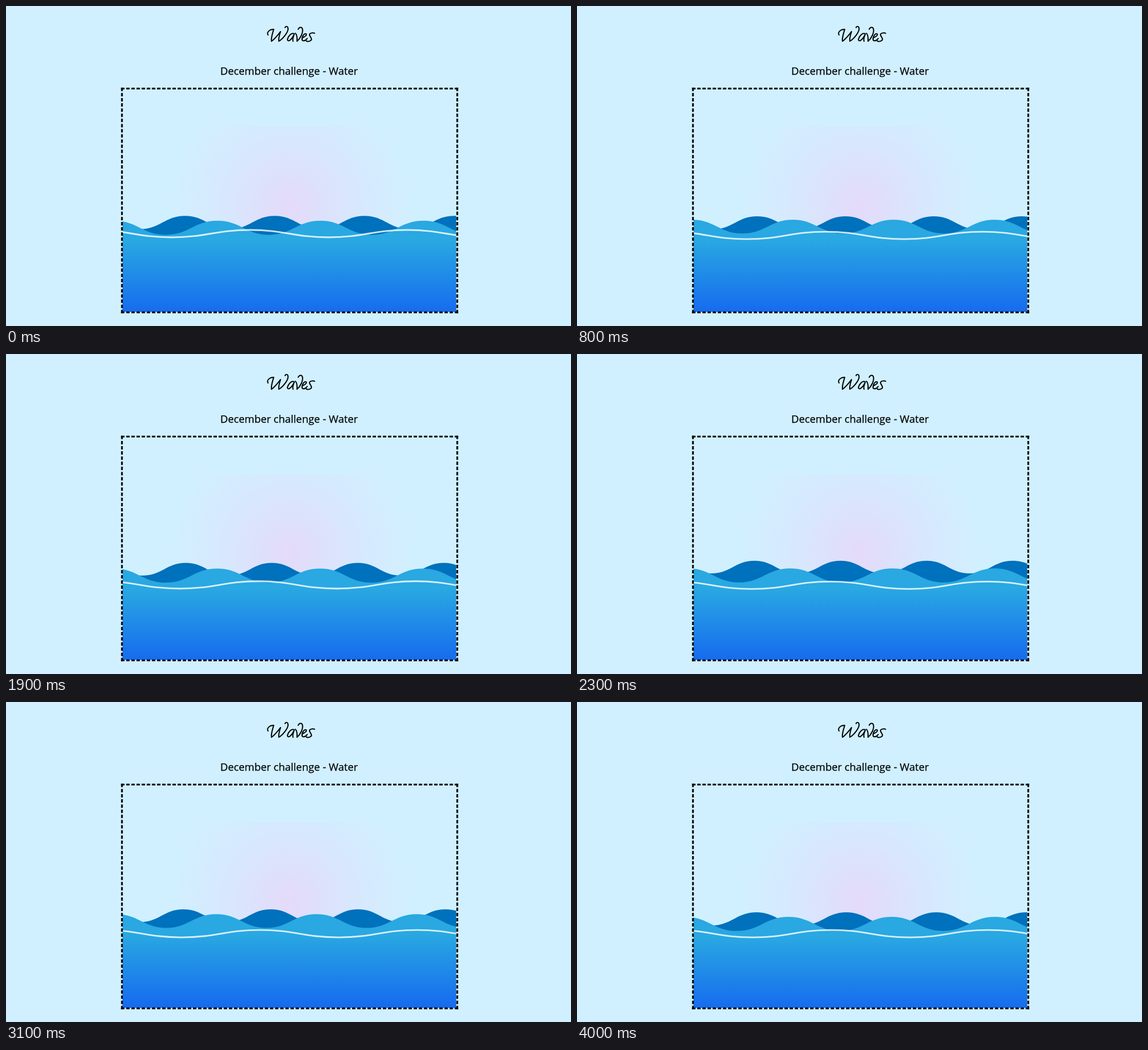
Animation, 994 px wide and 563 px high, one loop 4.1 s. Source, as an HTML page with a canvas:

```html
<!DOCTYPE html>
<html lang="en">
<head>
<meta charset="utf-8">
<title>Waves</title>
<style>
  html, body { margin: 0; width: 100%; height: 100%; overflow: hidden; background: #d0f0ff; }
  svg, canvas { position: absolute; left: 0; top: 0; }
  text { font: 18.4px "Open Sans", sans-serif; stroke: #000; stroke-width: .25; }
</style>
</head>
<body>
<canvas width="994" height="563"></canvas>
<svg width="994" height="140">
  <g role="img" aria-label="Waves" fill="none" stroke="#000" stroke-width="2" stroke-linecap="round" stroke-linejoin="round">
    <path d="M461 51C458 46 464 41 471 41C469 48 466 56 467 62C473 58 478 51 483 45C481 51 479 57 480 62C487 58 498 45 496 38C495 35 491 36 491 38"/>
    <path d="M507 49C502 46 496 54 495 59C496 64 502 60 507 50C505 55 504 60 505 62"/>
    <path d="M509 48C513 51 512 57 512 62C518 57 524 46 521 39C519 36 515 38 514 41"/>
    <path d="M521 56C525 55 530 51 528 49C525 47 520 54 521 60C523 63 528 60 530 57"/>
    <path d="M543 48C540 46 533 48 534 51C535 55 539 57 537 60C534 63 529 63 528 61"/>
  </g>
  <text x="377" y="120.5">December challenge - Water</text>
</svg>
<script>
const LEFT = 205, TOP = 147, RIGHT = 792, BOTTOM = 538;
const LOOP = 4100, STEP = 100, SKY = '#d0f0ff';
const ctx = document.querySelector('canvas').getContext('2d');

// Each swell eases through three poses in turn
const backSwell = {
  period: 3600, start: 250, steepness: .147,
  poses: [{ x: 474, length: 158.5, y: 370 }, { x: 470, length: 151.3, y: 370 }, { x: 462, length: 151.5, y: 362.3 }]
};
const frontSwell = {
  period: 1950, start: 80, steepness: .137,
  poses: [{ x: 553.5, length: 181.5, y: 378 }, { x: 557.5, length: 177.5, y: 376 }, { x: 542, length: 176, y: 372.3 }]
};

function poseAt({ period, start, steepness, poses }, t) {
  const progress = ((t - start) / period + 1) % 1 * poses.length;
  const i = Math.floor(progress), from = poses[i], to = poses[(i + 1) % poses.length];
  const eased = (1 - Math.cos((progress - i) * Math.PI)) / 2;
  const mix = key => from[key] + (to[key] - from[key]) * eased;
  return { x: mix('x'), y: mix('y'), length: mix('length'), height: mix('length') * steepness };
}

function traceWave({ x, y, length, height }) {
  const half = length / 2, handle = half * .45;
  let px = x - Math.ceil((x - LEFT) / length) * length, py = y;
  ctx.beginPath();
  ctx.moveTo(px, py);
  while (px < RIGHT) {
    const next = py === y ? y + height : y;
    ctx.bezierCurveTo(px + handle, py, px + half - handle, next, px + half, next);
    px += half;
    py = next;
  }
  return px;
}

function fillWave(wave, fill) {
  ctx.lineTo(traceWave(wave), BOTTOM);
  ctx.lineTo(0, BOTTOM);
  ctx.fillStyle = fill;
  ctx.fill();
}

function withStops(gradient, ...colors) {
  colors.forEach((color, i) => gradient.addColorStop(i / (colors.length - 1), color));
  return gradient;
}

const glow = withStops(ctx.createRadialGradient(500, 350, 0, 500, 350, 215), '#e4daf9', '#d8e7fd', SKY);

function drawSide(x1, y1, x2, y2) {
  const length = Math.hypot(x2 - x1, y2 - y1), dash = 6;
  const count = Math.round((length + 3) / 9);
  ctx.setLineDash([dash, (length - count * dash) / (count - 1)]);
  ctx.beginPath();
  ctx.moveTo(x1, y1);
  ctx.lineTo(x2, y2);
  ctx.stroke();
}

function drawFrame() {
  const [left, top, right, bottom] = [202.5, 143.8, 795.4, 540.5], inset = 1.5;
  ctx.strokeStyle = '#000';
  ctx.lineWidth = 3;
  for (const y of [top + inset, bottom - inset]) drawSide(left, y, right, y);
  for (const x of [left + inset, right - inset]) drawSide(x, top, x, bottom);
  ctx.setLineDash([]);
}

function draw(now) {
  const t = Math.floor(now / STEP) * STEP % LOOP;
  ctx.fillStyle = SKY;
  ctx.fillRect(0, 0, 994, 563);

  ctx.save();
  ctx.beginPath();
  ctx.rect(LEFT, TOP, RIGHT - LEFT, BOTTOM - TOP);
  ctx.clip();
  ctx.fillStyle = glow;
  ctx.fillRect(LEFT, 212, RIGHT - LEFT, BOTTOM - 212);

  fillWave(poseAt(backSwell, t), '#0071bc');
  const front = poseAt(frontSwell, t);
  fillWave(front, withStops(ctx.createLinearGradient(0, front.y + 35, 0, front.y + 168), '#29a8e2', '#1568ef'));

  const drift = 1 - (1 - t / 4000) ** 2.5;
  traceWave({ x: 429.5 + 18 * drift, y: 394 + 7.2 * drift, length: 276.5, height: 13 });
  ctx.strokeStyle = 'rgba(255, 255, 255, .82)';
  ctx.lineWidth = 2.8;
  ctx.stroke();
  ctx.restore();

  drawFrame();
}

function tick() {
  draw(performance.now());
  requestAnimationFrame(tick);
}
tick();
</script>
</body>
</html>
```
